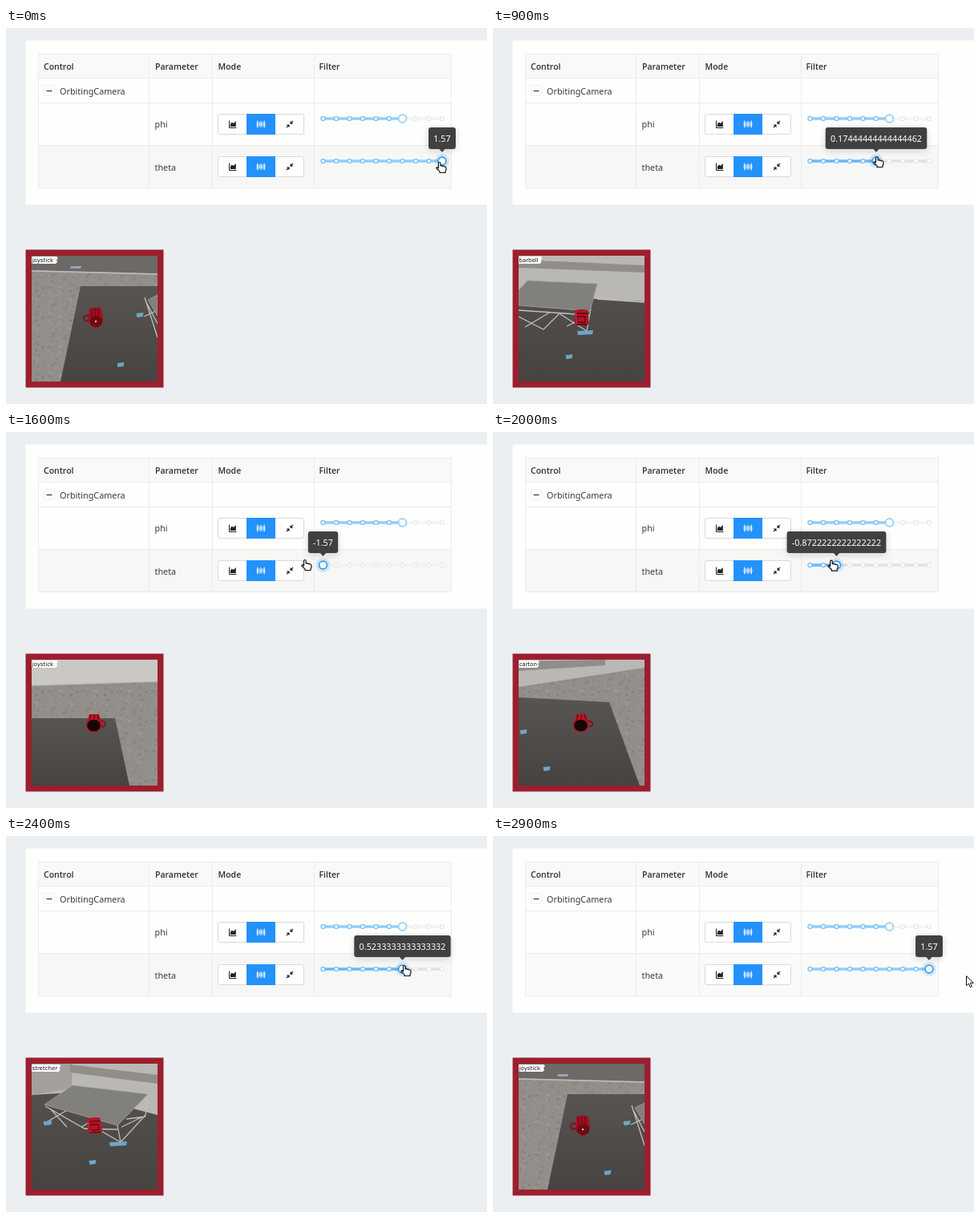
An HTML page that plays this animation: 600 by 469 pixels, repeating every 3 s.

```html
<!DOCTYPE html>
<html lang="en">
<head>
<meta charset="utf-8">
<title>Orbiting camera control</title>
<style>
html, body { margin: 0; width: 100%; height: 100%; overflow: hidden; background: #eceff1; }
svg { display: block; width: 600px; height: 469px; }
text { font: 10.8px "Noto Sans", "Open Sans", sans-serif; fill: #3b3b3b; }
.head { font: 600 10.5px "Open Sans", "Noto Sans", sans-serif; fill: #303030; }
.tag { font: 7px "DejaVu Sans", sans-serif; fill: #111; }
#tip text { fill: #fff; text-anchor: middle; }
</style>
</head>
<body>
<svg viewBox="0 0 600 469">
  <defs>
    <clipPath id="view"><rect x="32" y="284" width="157" height="157"/></clipPath>
    <pattern id="fleck" width="43" height="37" patternUnits="userSpaceOnUse"></pattern>
    <linearGradient id="floor" x2="0" y2="1">
      <stop stop-color="#575451"/><stop offset="1" stop-color="#464340"/>
    </linearGradient>
    <filter id="shade" x="-30%" y="-60%" width="160%" height="250%">
      <feDropShadow dx="0" dy="2" stdDeviation="4" flood-opacity=".16"/>
    </filter>
    <g id="modes">
      <rect x="264.5" y="-12.5" width="107" height="25" rx="2" fill="#fff" stroke="#d9d9d9"/>
      <rect x="300" y="-13" width="36" height="26" fill="#2492fb"/>
      <path d="M278.5-4.5v9h9" fill="none" stroke="#222"/>
      <path d="M279.8 3V0l2-2.500 2 1.500 3-3V3z" fill="#222"/>
      <g fill="none" stroke="#fff">
        <path d="M314-4.500q-2 4.500 0 9M322-4.500q2 4.500 0 9M318-4v8"/>
        <ellipse cx="315.500" rx="1.200" ry="2.500"/><ellipse cx="320.500" rx="1.200" ry="2.500"/>
      </g>
      <path d="M358-4l-3 3M350 4l3-3" stroke="#222" stroke-width="1.200"/>
      <path d="M354.500-4v3.800h3.800zM353.500 4.200V.4h-3.800z" fill="#222"/>
    </g>
    <path id="hand" d="M3.500 8V1.700q0-1.200 1.300-1.200t1.300 1.200V5q1.500-.8 2.300.3 1.400-.6 2.200.6 2.400-.4 2.400 1.700v2.100l-1 2v1.800H5.100v-1.600L1 8.200q-.4-1.600 1-1.600z" fill="#fff" stroke="#111" stroke-width="1.200" stroke-linejoin="round"/>
    <path id="arrow" d="M.5.5v12.300l2.900-2.700 2 4.600 2-.9-2-4.400h3.800z" fill="#fff" stroke="#111" stroke-linejoin="round"/>
  </defs>

  <rect width="600" height="469" fill="#eceff1"/>
  <rect x="24.500" y="15.500" width="576" height="205" fill="#fefefd"/>
  <rect x="40" y="32" width="515.500" height="30.500" fill="#f9f9f8"/>
  <rect id="row" x="40" y="146.500" width="515.500" height="53" fill="#f7f7f6"/>
  <path d="M40.500 32.500h515v167h-515zM40.500 62.500h515M40.500 93.500h515M40.500 146.500h515M178.500 32.500v167M257.500 32.500v167M384.500 32.500v167" fill="none" stroke="#ebebea"/>
  <rect x="47.500" y="71.500" width="13" height="13" rx="2" fill="#fff" stroke="#efefef"/>
  <path d="M50.500 78.500h7" stroke="#333" stroke-width="1.200"/>
  <text class="head" x="47" y="52">Control</text>
  <text class="head" x="186" y="52">Parameter</text>
  <text class="head" x="264.500" y="52">Mode</text>
  <text class="head" x="390.500" y="52">Filter</text>
  <text x="67" y="82.500">OrbitingCamera</text>
  <text x="185.500" y="124">phi</text>
  <text x="185.500" y="177.500">theta</text>
  <use href="#modes" y="120"/>
  <use href="#modes" y="173"/>
  <g id="phi"></g>
  <g id="theta"></g>

  <rect x="24.500" y="276.500" width="172" height="172" fill="#9c1f2f"/>
  <g id="scene" clip-path="url(#view)"></g>

  <g id="tip">
    <g filter="url(#shade)"><rect id="box" y="124" height="27" rx="3" fill="#404040"/></g>
    <path d="M-4 150.500h8l-4 4.500z" fill="#404040"/>
    <text y="142"></text>
  </g>
  <use id="cursor"/>
</svg>
<script>
const $ = id => document.getElementById(id);
const STEP = 100, LOOP = 3000, LEFT = 395.5, GAP = 16.5;

// slider notch for each step of the loop
const notches = "999998876543211000012345678999".replace("10000123", "100001123").slice(0, 0)
  || "99999" + "88765" + "43211" + "00001" + "23456" + "78999";
const values = ["-1.57", "-1.2211111111111113", "-0.8722222222222222", "-0.5233333333333334",
  "-0.17444444444444462", "0.17444444444444462", "0.5233333333333332",
  "0.8722222222222218", "1.2211111111111108", "1.57"];
// cursor path: step, x, y
const path = [[0, 536, 167], [3, 537, 162], [5, 537, 162], [9, 474, 160], [16, 368, 159],
  [17, 368, 159], [22, 450, 160], [24, 492, 161], [27, 541, 165], [28, 572, 170], [29, 590, 174]];

const shape = (fill, d) => `<path d="${d}" fill="${fill}"/>`;
const wall = d => shape("#b9b8b4", d);
const band = d => shape("#918e8a", d);
const mat = d => shape("url(#floor)", d);
const carpet = d => shape("#928e89", d) + shape("url(#fleck)", d);
const edge = d => `<path d="${d}" fill="none" stroke="#c1bfbb" stroke-width="1.3"/>`;
const deck = (top, legs) => edge(legs) +
  `<path d="${top}" fill="#81807d" stroke="#a5a4a0" stroke-width=".8"/>`;
const tape = (x, y, w = 9) =>
  shape("#6fa5c9", `M${x - w / 2} ${y - 2}l${w} -1l-1 5l${2 - w} 1z`);
const all = "M32 284h157v157H32z";

function mug(i) {
  const ring = (x, y) => `<ellipse cx="${x}" cy="${y}" rx="4" ry="3.5" fill="none" stroke="#8e0b1a" stroke-width="2"/>`;
  if (i > 7) return `<g transform="rotate(${i > 8 ? 0 : 25} 111 362)">${ring(101, 362)}
    <path d="M104 350q8-3 15 0l2 13q-1 10-9 11-8-1-9-10z" fill="#a30f20"/>
    <path d="M107 350v12M111 349v12M115 349v12" stroke="#5d0913"/>
    <ellipse cx="112.500" cy="366" rx="8" ry="7" fill="#6f0a16"/>
    <circle cx="112" cy="366" r="1.200" fill="#e8b9b9"/></g>`;
  if (i > 3) return `<g transform="rotate(${(i - 5) * -4} 110 362)">
    <path d="M102 352q8-2 16 0l2 17q-9 4-18 1z" fill="#b51325"/>
    <path d="M104 356h14M105 360v7h10v-7zM104 370h14" fill="none" stroke="#590914" stroke-width="1.300"/>
    <path d="M103 354l2 15" stroke="#dc3443"/></g>`;
  return ring(120, 364) + `<path d="M104 352h12l4 13q-10 8-20 0z" fill="#bd1426"/>
    <path d="M106 352l-2 8M110 352v8M114 352l2 8" stroke="#4d0811"/>
    <ellipse cx="109.500" cy="366" rx="9" ry="8" fill="#170608" stroke="#bd1426" stroke-width="1.300"/>`;
}

const scenes = [
  () => carpet(all) + shape("#c9c8c4", "M32 284h157v27L32 316z") + edge("M32 316L189 311") +
    mat("M32 357H136L154 441H32z"),
  () => carpet(all) + wall("M32 284h157v25L32 312z") + edge("M32 312L189 309") +
    mat("M32 345L138 348 165 441H32z"),
  () => carpet(all) + wall("M32 284h157v10L32 318z") + band("M32 286L140 284V291L32 298z") +
    mat("M32 331L145 337 183 441H32z") + tape(38, 374) + tape(67, 420),
  () => mat(all) + wall("M32 284h140v20L150 327 32 328z") + band("M32 287L156 292V301L32 300z") +
    carpet("M154 327L176 284h13V384z") +
    deck("M32 322L52 320 65 350 32 357z", "M64 350V377M32 360L64 377M32 378L64 352") +
    tape(67, 378, 14) + tape(76, 418),
  () => mat(all) + wall("M32 284h150L170 332 92 341 32 322z") + band("M32 288L174 292V301L32 302z") +
    carpet("M170 332L172 302 189 284V349z") + edge("M90 340L170 331") +
    deck("M32 320L80 318 92 352 32 362z", "M91 352V364L62 383 32 367M33 382L88 363M40 379L70 362") +
    tape(90, 381, 17) + tape(84, 415),
  () => mat(all) + wall("M32 284h157v57L128 338 32 330z") + band("M32 289L189 296V305L32 299z") +
    edge("M130 338L189 342") +
    deck("M43 315L130 319 121 353 32 346V327z", "M32 352L118 358M32 360L63 376 84 355M40 373L72 354M84 357L117 378 122 350M92 372L120 358") +
    tape(115, 380, 20) + tape(95, 410),
  () => mat(all) + wall("M32 284h157v64L82 320 32 323z") + shape("#a3a09c", "M32 284h50v31L32 323z") +
    band("M80 285L189 298V309L80 295z") +
    deck("M48 335L83 311 177 322 139 361z", "M49 337L98 365 139 366M52 356L78 341M55 340L76 363M94 363L117 349M110 363L143 382 139 361M143 382L174 348 177 325M144 363L171 350M150 353L174 350") +
    tape(52, 358, 11) + tape(140, 384, 22) + tape(108, 407),
  () => mat(all) + carpet("M32 292L105 284V303L32 340z") + wall("M105 284h84v38L105 304z") +
    band("M120 284h69v15z") +
    deck("M88 332L121 308 189 315V361L164 366z", "M90 334L132 363 163 368M92 353L120 340M98 341L118 360M134 361L168 393 164 366M168 393L189 361M168 369L189 385") +
    tape(91, 355, 11) + tape(164, 396, 22) + tape(121, 410),
  () => carpet(all) + shape("#74716e", "M32 284h128v15L32 315z") + wall("M158 284h31v37L158 305z") +
    mat("M40 326L160 305 189 312V441H75z") +
    deck("M132 332L164 310 189 314V360z", "M133 334L162 375 189 408M135 345L189 382M143 355L165 349M153 372L184 355M161 374L180 358M174 392L189 374") +
    tape(127, 351, 10) + tape(181, 408, 18) + tape(134, 412, 10),
  () => carpet(all) + shape("#6c6966", "M32 284h157v22L32 302z") + edge("M32 303L189 307") +
    mat("M93 322H189V441H68z") + shape("#98a3bb", "M81 297h13l-1 3H80z") +
    deck("M177 339L189 333V359z", "M173 336L189 386M174 340L189 369M172 360L189 352") +
    tape(167, 358, 9) + tape(143, 420)
];
const tags = ["joystick", "joystick", "carton", "desk", "desk", "barbell", "stretcher", "stretcher", "carton", "joystick"];

function label(name) {
  const w = name.length * 3.5 + 3;
  return `<path d="M32 285h${w}l2 2-2 2 1 3-2 2H32z" fill="#fff"/><text class="tag" x="32.500" y="292">${name}</text>`;
}

function slider(y, at, hover, focus) {
  const x = LEFT + at * GAP, end = LEFT + 9 * GAP;
  const bar = (a, b, c) => `<path d="M${a} ${y}H${b}" stroke="${c}" stroke-width="3.300"/>`;
  let out = bar(LEFT - 2, end + 2, hover ? "#e1e1e1" : "#f4f4f4") +
    bar(LEFT, x, hover ? "#69b9fa" : "#91cffb");
  for (let i = 0; i < 10; i++)
    out += `<circle cx="${LEFT + i * GAP}" cy="${y}" r="2.500" fill="#fff" stroke="${i <= at ? "#85c5fa" : "#ebebeb"}" stroke-width="1.500"/>`;
  if (focus) out += `<circle cx="${x}" cy="${y}" r="9" fill="#1890ff" opacity=".17"/>`;
  return out + `<circle cx="${x}" cy="${y}" r="4.900" fill="#fff" stroke="${focus ? "#3599ee" : "#91cffb"}" stroke-width="1.700"/>`;
}

function cursorAt(n) {
  const k = Math.max(1, path.findIndex(p => p[0] >= n));
  const [a, b] = [path[k - 1], path[k]], f = (n - a[0]) / (b[0] - a[0]);
  return [1, 2].map(j => a[j] + (b[j] - a[j]) * f);
}

function draw(n) {
  const at = +notches[n], x = LEFT + at * GAP;
  const hover = n > 0 && n < 28 && (n < 15 || n > 17);
  $("theta").innerHTML = slider(166, at, hover, true);
  $("scene").innerHTML = scenes[at]() + mug(at) + label(tags[at]);
  $("row").setAttribute("opacity", n > 27 ? .5 : 1);

  const text = $("tip").querySelector("text");
  text.textContent = values[at];
  const w = text.getComputedTextLength() + 12.5;
  $("box").setAttribute("x", -w / 2);
  $("box").setAttribute("width", w);
  $("tip").setAttribute("transform", `translate(${x} 0)`);

  const [cx, cy] = cursorAt(n);
  $("cursor").setAttribute("href", n > 27 ? "#arrow" : "#hand");
  $("cursor").setAttribute("transform", `translate(${cx} ${cy})`);
}

let seed = 7;
const rand = () => (seed = seed * 16807 % 2147483647) / 2147483647;
for (let i = 0; i < 70; i++)
  $("fleck").innerHTML += `<circle cx="${rand() * 43}" cy="${rand() * 37}" r="${.6 + rand()}" fill="${i % 2 ? "#fff" : "#000"}" opacity=".07"/>`;
$("phi").innerHTML = slider(113, 6, false, false);

let last = -1;
const start = performance.now();
function tick() {
  const n = Math.floor((performance.now() - start) % LOOP / STEP);
  if (n !== last) draw(last = n);
  requestAnimationFrame(tick);
}
draw(last = 0);
requestAnimationFrame(tick);
</script>
</body>
</html>
```
